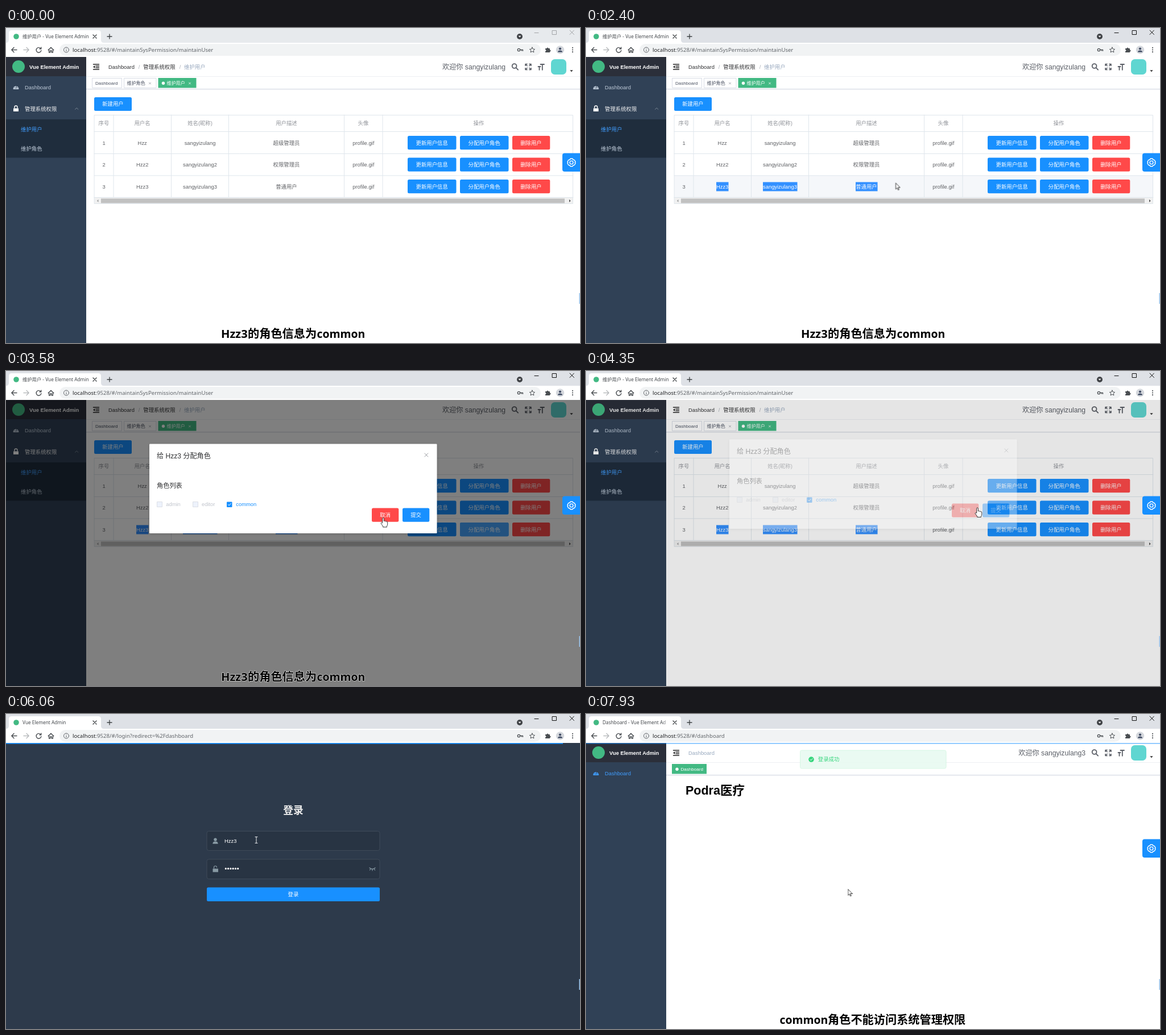
An HTML page for the animation above (8 s loop, 1009 by 555 pixels).

```html
<!DOCTYPE html>
<html lang="zh-CN">
<head>
<meta charset="utf-8">
<title>维护用户</title>
<style>
html, body { margin: 0; width: 100%; height: 100%; overflow: hidden; background: #fff; }
svg { display: block; width: 1009px; height: 555px; font: 9.4px "Liberation Sans", "Noto Sans CJK SC", "Noto Sans CJK", sans-serif; }
text { white-space: pre; }
.mid { text-anchor: middle; }
.ui { font-family: "Noto Sans", "Noto Sans CJK SC", "Noto Sans CJK", sans-serif; }
.tab { font-size: 8.3px; fill: #45494d; }
.url { font-size: 9.58px; fill: #5f6368; }
.host { fill: #202124; }
.tag { font-size: 8.05px; fill: #495060; }
.small { font-size: 9px; }
.caption { font: bold 20.2px "Noto Sans", "Noto Sans CJK SC", "Noto Sans CJK", sans-serif; stroke: #fff; stroke-width: 1; paint-order: stroke; }
.caption .en { font-size: 19.4px; }
.line { fill: none; stroke-linecap: round; stroke-linejoin: round; }
.blue { fill: #1890ff; }
.red { fill: #ff4949; }
.white { fill: #fff; }

/* Every part shares one 8 s clock: .cut switches hard, .glide interpolates. */
.cut { animation: 8s step-end infinite; }
.glide { animation: 8s linear infinite; }

@keyframes shell { 0% { opacity: 1 } 70.5% { opacity: 0 } 95.25%, to { opacity: 1 } }
@keyframes admin { 0% { opacity: 1 } 70.5%, to { opacity: 0 } }
@keyframes login { 0% { opacity: 0 } 70.5% { opacity: 1 } 95.25%, to { opacity: 0 } }
@keyframes home { 0% { opacity: 0 } 95.25%, to { opacity: 1 } }
@keyframes strip { 0% { fill: #e7eaed } 11.9%, to { fill: #dee1e6 } }
@keyframes controls { 0% { stroke: #a2a4a7 } 11.9%, to { stroke: #111 } }
@keyframes rowHover { 0% { opacity: 0 } 11% { opacity: 1 } 40%, to { opacity: 0 } }
@keyframes roleHover { 0% { opacity: 0 } 35.8% { opacity: 1 } 50%, to { opacity: 0 } }
@keyframes select {
  0%, 12% { width: 0 } 13.75% { width: 10px } 21.1% { width: 205px } 25%, to { width: 305px }
}
@keyframes dim {
  0%, 37.9% { opacity: 0 } 40.4%, 53% { opacity: .5 } 54.375%, 54.9% { opacity: .1 } 55.6%, to { opacity: 0 }
}
@keyframes dialog {
  0%, 37.9% { opacity: 0; transform: translateY(-20px) }
  41.6%, 53% { opacity: 1; transform: none }
  54.375%, 54.9% { opacity: .35; transform: translateY(-8px) }
  56.5%, to { opacity: 0; transform: translateY(-20px) }
}
@keyframes menu { 0%, 61.2% { opacity: 0 } 63.5%, 69% { opacity: 1 } 70.4%, to { opacity: 0 } }
@keyframes menuHover { 0% { opacity: 0 } 66.3%, to { opacity: 1 } }
@keyframes caret { 0% { opacity: 0 } 77% { opacity: 1 } 82.5% { opacity: 0 } 84.5% { opacity: 1 } 92.5%, to { opacity: 0 } }
@keyframes suggest {
  0%, 86.5% { opacity: 0 } 87.375%, 88.6% { opacity: .6 } 89.4%, 91.3% { opacity: 1 } 92.3%, to { opacity: 0 }
}
@keyframes pick { 0% { opacity: 0 } 90.5%, to { opacity: 1 } }
@keyframes press { 0% { opacity: 0 } 92.8%, to { opacity: 1 } }
@keyframes progress {
  0%, 69.5% { transform: scaleX(0); opacity: 1 }
  72% { transform: scaleX(.5); opacity: 1 }
  76% { transform: scaleX(1); opacity: 1 }
  79% { transform: scaleX(1); opacity: 0 }
  80%, 94.5% { transform: scaleX(0); opacity: 0 }
  95% { transform: scaleX(.1); opacity: 1 }
  98% { transform: scaleX(1); opacity: 1 }
  99.1%, to { transform: scaleX(1); opacity: .55 }
}
@keyframes toast {
  0%, 97% { opacity: 0; transform: translateY(-25px) }
  99.1% { opacity: .85; transform: none }
  to { opacity: .9; transform: translateY(1px) }
}
@keyframes captionA { 0% { opacity: 1 } 50%, to { opacity: 0 } }
@keyframes captionB { 0% { opacity: 0 } 96%, to { opacity: 1 } }
@keyframes pointer {
  0%, 1% { transform: translate(300px, 560px) }
  7.5% { transform: translate(180px, 345px) }
  10.4% { transform: translate(215px, 302px) }
  11.9% { transform: translate(226px, 280px) }
  13.75% { transform: translate(234px, 280px) }
  21.1% { transform: translate(430px, 283px) }
  25% { transform: translate(530px, 280px) }
  28%, 31.25% { transform: translate(544.5px, 273.5px) }
  36.25%, 38.1% { transform: translate(838px, 282px) }
  43.1%, 51.9% { transform: translate(663px, 258.5px) }
  54.375%, 55% { transform: translate(688px, 241px) }
  59.4%, 61.25% { transform: translate(972px, 68px) }
  66.9%, 69% { transform: translate(965.5px, 202px) }
  75.6%, 83.75% { transform: translate(440px, 222px) }
  87.375%, 88.6% { transform: translate(469.5px, 261px) }
  90.6%, 91.5% { transform: translate(440px, 326px) }
  93.5%, to { transform: translate(460.5px, 309px) }
}
@keyframes arrow {
  0% { opacity: 0 } 1% { opacity: 1 } 35.6% { opacity: 0 } 38.8% { opacity: 1 } 42.9% { opacity: 0 }
  55% { opacity: 1 } 59% { opacity: 0 } 61.5% { opacity: 1 } 62.5% { opacity: 0 } 69.5% { opacity: 1 }
  75.4% { opacity: 0 } 84% { opacity: 1 } 92.5% { opacity: 0 } 95.6%, to { opacity: 1 }
}
@keyframes hand {
  0% { opacity: 0 } 35.6% { opacity: 1 } 38.8% { opacity: 0 } 42.9% { opacity: 1 } 55% { opacity: 0 }
  59% { opacity: 1 } 61.5% { opacity: 0 } 62.5% { opacity: 1 } 69.5% { opacity: 0 }
  92.5% { opacity: 1 } 95.6%, to { opacity: 0 }
}
@keyframes beam { 0% { opacity: 0 } 75.4% { opacity: 1 } 84%, to { opacity: 0 } }
</style>
</head>
<body>
<svg viewBox="0 0 1009 555">
<defs>
  <g id="ops" class="mid white">
    <rect class="blue" x="706" y="190" width="85.5" height="24.3" rx="2.5"/>
    <rect class="blue" x="798" y="190" width="85.5" height="24.3" rx="2.5"/>
    <rect class="red" x="890" y="190" width="66.3" height="24.3" rx="2.5"/>
    <text x="748.7" y="205.5">更新用户信息</text>
    <text x="840.7" y="205.5">分配用户角色</text>
    <text x="923" y="205.5">删除用户</text>
  </g>
  <g id="gauge">
    <path d="M-4.8 3.6A4.9 4.9 0 1 1 4.8 3.6Z"/>
    <path d="M0 2 1-2M-3 .8h.4M2.7.8h.4M-2-1.9l.2.2" class="line" stroke="#304156"/>
  </g>
  <path id="x" class="line" d="M-3-3 3 3M3-3-3 3"/>
  <linearGradient id="fade"><stop stop-color="#fff" stop-opacity="0"/><stop offset="1" stop-color="#fff"/></linearGradient>
  <filter id="shadow" x="-20%" y="-20%" width="140%" height="150%"><feDropShadow dx="0" dy="1.3" stdDeviation="2.5" flood-opacity=".18"/></filter>
  <clipPath id="drag"><rect class="glide" style="animation-name:select" x="225" y="268" width="0" height="24"/></clipPath>
</defs>

<!-- browser -->
<rect class="cut" style="animation-name:strip" width="1009" height="27"/>
<path class="white" d="M0 26Q5 26 5 21V9Q5 4 10 4H162Q167 4 167 9V21Q167 26 172 26H1009V51H0Z"/>
<circle cx="18" cy="15" r="4.8" fill="#42b983"/>
<g class="ui tab">
  <text class="cut" style="animation-name:admin" x="29" y="18.3">维护用户 - Vue Element Admin</text>
  <text class="cut" style="animation-name:login" x="29" y="18.3">Vue Element Admin</text>
  <g class="cut" style="animation-name:home">
    <text x="29" y="18.3">Dashboard - Vue Element Ad</text>
    <rect x="134" y="8" width="14" height="14" fill="url(#fade)"/>
  </g>
</g>
<g stroke="#3c4043" stroke-width="1.3">
  <use href="#x" x="156" y="15"/>
  <path d="M177.5 15h9M182 10.5v9"/>
</g>
<circle cx="903" cy="15" r="5" fill="#404347"/>
<path class="white" d="M900.5 13.7h5L903 16.6Z"/>
<path class="line cut" style="animation-name:controls" d="M929 8.5h7M960.5 4.5h7v7h-7ZM991 4l7.5 7.5M998.5 4 991 11.5"/>

<g class="line" stroke="#4a4e52" stroke-width="1.4">
  <path d="M19 38.5H10M14 34.3l-4.2 4.2 4.2 4.2"/>
  <path stroke="#b8babd" d="M31 38.5h9M36 34.3l4.2 4.2-4.2 4.2"/>
  <path d="M61.2 36.3A4.4 4.4 0 1 0 61.9 39.5M61.8 34v2.8H59"/>
  <path d="M74.2 38.7 79 34.3l4.8 4.4M75.6 38v5h2.2v-3h2.4v3h2.2v-5"/>
</g>
<rect x="94" y="28" width="846" height="21" rx="10.5" fill="#f1f3f4"/>
<g class="line" stroke="#5f6368"><circle cx="106" cy="38.5" r="4.5"/><path d="M106 38.3v2.5M106 36.1v.1"/></g>
<g class="ui url">
  <text class="cut" style="animation-name:admin" x="117" y="42"><tspan class="host">localhost</tspan>:9528/#/maintainSysPermission/maintainUser</text>
  <text class="cut" style="animation-name:login" x="117" y="42"><tspan class="host">localhost</tspan>:9528/#/login?redirect=%2Fdashboard</text>
  <text class="cut" style="animation-name:home" x="117" y="42"><tspan class="host">localhost</tspan>:9528/#/dashboard</text>
</g>
<g class="line" stroke="#4a4e52" stroke-width="1.3">
  <circle cx="901.5" cy="38.5" r="2.2"/><path d="M904 38.3h4.5v2M906.3 38.3v1.8"/>
  <path stroke-width="1" d="M925 34l1.4 3 3.2.4-2.4 2.2.7 3.3-2.9-1.7-2.9 1.7.7-3.3-2.4-2.2 3.2-.4Z"/>
</g>
<path fill="#4a4e52" d="M948 36h2.4a1.6 1.6 0 1 1 3.2 0h2.4v2.4a1.6 1.6 0 1 1 0 3.2V43h-8v-2a1.4 1.4 0 1 0 0-2.8Z"/>
<circle cx="974" cy="38.5" r="7.2" fill="#d5d8dd"/>
<g fill="#3f4b63"><circle cx="974" cy="36.5" r="2.1"/><path d="M970 42.4q0-3 4-3t4 3Z"/></g>
<g fill="#4a4e52"><circle cx="996" cy="34.8" r="1.1"/><circle cx="996" cy="38.5" r="1.1"/><circle cx="996" cy="42.2" r="1.1"/></g>

<!-- shared shell -->
<g class="cut" style="animation-name:shell">
  <rect class="white" y="51" width="1009" height="504"/>
  <rect y="51" width="141" height="504" fill="#304156"/>
  <rect y="51" width="141" height="34" fill="#2b2f3a"/>
  <circle cx="22" cy="68" r="11" fill="#42b983"/>
  <text class="white" x="41" y="71.6" font-weight="bold">Vue Element Admin</text>
  <path stroke="#eef0f3" d="M141 85.5h868"/>
  <path stroke="#d8dce5" d="M141 107.5h868"/>
  <path stroke="#f3f4f6" d="M141 108.5h868"/>
  <g class="line" stroke="#222" stroke-width="1.4"><path d="M153.5 64h10M158 67h5.5M158 70h5.5M153.5 73h10"/></g>
  <path fill="#222" d="M156.3 66v5l-3.2-2.5Z"/>
  <g class="line" stroke="#5a5e66" stroke-width="1.8">
    <circle cx="893.6" cy="67" r="3.9"/><path d="M896.6 70.2l3.5 3.5"/>
    <path stroke-width="1.5" d="M913 66.5V63.500h3.200M919.800 63.500h3.200v3M923 70.500v3h-3.200M916.200 73.500H913v-3M913.200 63.700l3 3M922.800 63.700l-3 3M913.200 73.300l3-3M922.800 73.300l-3-3"/>
    <path d="M939.500 64h6.500M942.800 64v9.800M935.500 68h4M937.500 68v5.800"/>
  </g>
  <rect x="958" y="55" width="27" height="27" rx="6.7" fill="#5fd6d1"/>
  <path fill="#333" d="M991.3 74.300h5.400l-2.700 2.900Z"/>
</g>

<!-- user table -->
<g class="cut" style="animation-name:admin">
  <g fill="#bfcbd9">
    <use href="#gauge" x="17.500" y="104.500"/>
    <text x="33" y="108">Dashboard</text>
  </g>
  <path class="white" d="M13 141.500h9v5.500h-9Z"/>
  <path class="line" stroke="#fff" stroke-width="1.400" d="M15 141v-1.500a2.500 2.500 0 0 1 5 0v1.500"/>
  <text x="33" y="146" fill="#f4f4f5">管理系统权限</text>
  <path class="line" stroke="#7b8796" d="M121.500 143.300l2.700-2.500 2.700 2.500"/>
  <rect y="161" width="141" height="67.500" fill="#1f2d3d"/>
  <text x="26" y="181.700" fill="#409eff">维护用户</text>
  <text x="26" y="215.700" fill="#bfcbd9">维护角色</text>

  <g fill="#303133">
    <text x="180" y="71.700">Dashboard</text>
    <text x="241.300" y="71.700">管理系统权限</text>
    <text x="232.800" y="71.700" fill="#a9adb5">/</text>
    <text x="304.700" y="71.700" fill="#a9adb5">/</text>
    <text x="313" y="71.700" fill="#97a8be">维护用户</text>
  </g>
  <text x="878" y="72.600" font-size="12.200" fill="#5a5e66" text-anchor="end">欢迎你 sangyizulang</text>

  <g class="tag">
    <g class="white" stroke="#d8dce5"><path d="M151.500 88.500h52v17h-52ZM207.500 88.500h56.500v17h-56.500Z"/></g>
    <rect x="267.500" y="88" width="67" height="17.500" fill="#42b983"/>
    <circle class="white" cx="276.500" cy="97.300" r="2.700"/>
    <text x="157" y="100">Dashboard</text>
    <text x="212.500" y="100">维护角色</text>
    <text class="white" x="282.500" y="100">维护用户</text>
    <use href="#x" transform="translate(253 97.500) scale(.5)" stroke="#8b909a" stroke-width="1.500"/>
    <use href="#x" transform="translate(323 97.500) scale(.5)" stroke="#fff" stroke-width="1.500"/>
  </g>

  <rect class="blue" x="155" y="122" width="66" height="24" rx="2.500"/>
  <text class="mid white" x="188" y="137.200">新建用户</text>

  <rect class="cut" style="animation-name:rowHover" x="155" y="260" width="842" height="38.500" fill="#f5f7fa"/>
  <rect x="155" y="299" width="842" height="11" fill="#f1f1f1"/>
  <rect x="167" y="300.500" width="815" height="8" fill="#c1c1c1"/>
  <path fill="#a3a3a3" d="M162.500 302v5l-2.700-2.500Z"/>
  <path fill="#505050" d="M990 302v5l2.700-2.500Z"/>
  <path class="line" stroke="#dfe6ec" d="M155.500 153.500H996.500V309.500H155.500ZM155 182.500H997M155 221.500H997M155 260H997M155 298.500H997M189 153V298.500M290.500 153V298.500M391.500 153V298.500M594.500 153V298.500M662 153V298.500"/>
  <g class="mid" fill="#909399">
    <text x="172" y="171">序号</text><text x="239.500" y="171">用户名</text><text x="341" y="171">姓名(昵称)</text>
    <text x="493" y="171">用户描述</text><text x="628" y="171">头像</text><text x="831" y="171">操作</text>
  </g>
  <g class="mid" fill="#606266">
    <text x="172" y="205.500">1</text><text x="239.700" y="205.500">Hzz</text><text x="341" y="205.500">sangyizulang</text>
    <text x="493" y="205.500">超级管理员</text><text x="628.300" y="205.500">profile.gif</text>
    <text x="172" y="244">2</text><text x="239.700" y="244">Hzz2</text><text x="341" y="244">sangyizulang2</text>
    <text x="493" y="244">权限管理员</text><text x="628.300" y="244">profile.gif</text>
    <text x="172" y="282.700">3</text><text x="239.700" y="282.700">Hzz3</text><text x="341" y="282.700">sangyizulang3</text>
    <text x="493" y="282.700">普通用户</text><text x="628.300" y="282.700">profile.gif</text>
  </g>
  <g class="mid white" clip-path="url(#drag)">
    <path fill="#3390ff" d="M229 271.500h21.500v16H229ZM311 271.500h60.500v16H311ZM474 271.500h38.500v16H474Z"/>
    <text x="239.700" y="282.700">Hzz3</text><text x="341" y="282.700">sangyizulang3</text><text x="493" y="282.700">普通用户</text>
  </g>
  <use href="#ops"/><use href="#ops" y="38.500"/><use href="#ops" y="77"/>
  <g class="cut mid white" style="animation-name:roleHover">
    <rect x="798" y="267" width="85.500" height="24.300" rx="2.500" fill="#46a6ff"/>
    <text x="840.700" y="282.500">分配用户角色</text>
  </g>

  <rect class="glide" style="animation-name:dim" y="51" width="1009" height="504"/>
  <g class="glide" style="animation-name:dialog">
    <rect class="white" x="252" y="128.500" width="505.500" height="157.500" rx="1.300" filter="url(#shadow)"/>
    <g fill="#303133">
      <text x="265" y="154" font-size="12.100">给 Hzz3 分配角色</text>
      <text x="265" y="206.300" font-size="11.200">角色列表</text>
    </g>
    <use href="#x" x="738.800" y="148" stroke="#909399" stroke-width=".9"/>
    <path fill="#edf2fc" stroke="#dcdfe6" d="M265.500 230.500h9v9h-9ZM328.500 230.500h9v9h-9Z"/>
    <rect class="blue" x="388" y="230.500" width="9.500" height="9.500" rx="1"/>
    <path class="line" stroke="#fff" d="M390.500 235.200l1.700 1.800 3-3.500"/>
    <g fill="#c0c4cc"><text x="281.300" y="238.200">admin</text><text x="344" y="238.200">editor</text></g>
    <text class="blue" x="404.300" y="238.200">common</text>
    <rect class="red" x="643" y="241.500" width="47.300" height="24.300" rx="2.500"/>
    <rect class="blue" x="697" y="241.500" width="47.300" height="24.300" rx="2.500"/>
    <g class="mid white"><text x="666.600" y="257">取消</text><text x="720.600" y="257">提交</text></g>
  </g>

  <g class="glide" style="animation-name:menu" fill="#606266">
    <path class="white" stroke="#e6eaf1" d="M919.500 93.500H967l4-3.500 4 3.500h14.500v119.500h-70Z" filter="url(#shadow)"/>
    <path stroke="#ebeef5" d="M920 183.500h69"/>
    <text x="931" y="111.500">Profile</text>
    <text x="931" y="131.700">Dashboard</text>
    <text x="931" y="152">Repovo</text>
    <text x="931" y="172.500">文档</text>
    <text x="931" y="201.500">退出</text>
    <g class="cut" style="animation-name:menuHover">
      <rect x="920" y="188" width="69.500" height="20" fill="#e8f4ff"/>
      <text x="931" y="201.500" fill="#46a6ff">退出</text>
    </g>
  </g>
</g>

<!-- dashboard -->
<g class="cut" style="animation-name:home">
  <g fill="#409eff"><use href="#gauge" x="17.500" y="104.500"/><text x="33" y="108">Dashboard</text></g>
  <text x="180" y="71.700" fill="#97a8be">Dashboard</text>
  <text x="878" y="72.600" font-size="12.200" fill="#5a5e66" text-anchor="end">欢迎你 sangyizulang3</text>
  <rect x="151" y="88" width="61" height="17.500" fill="#42b983"/>
  <circle class="white" cx="160" cy="97.300" r="2.700"/>
  <text class="tag" x="166.500" y="100" style="fill:#fff">Dashboard</text>
  <text x="175" y="142" font-size="21.500" font-weight="bold">Podra医疗</text>
  <g class="glide" style="animation-name:toast" fill="#13ce66">
    <rect x="376.500" y="64" width="256.500" height="32" rx="2.700" fill="#e7faf0" stroke="#d0f5e0"/>
    <circle cx="396" cy="80" r="4.800"/>
    <path class="line" stroke="#fff" d="M393.800 80l1.600 1.700 2.900-3.200"/>
    <text x="407.800" y="83.400" font-weight="500">登录成功</text>
  </g>
</g>

<g class="cut" style="animation-name:shell">
  <path class="blue" d="M1009 220.500H982q-4 0-4 4v24.500q0 4 4 4h27Z"/>
  <g class="line" stroke="#fff" stroke-width="1.400">
    <path d="M992 230.300h4l1 1.900 2.200.3 1.900 3.300-1 1.200 1 1.200-1.900 3.300-2.200.3-1 1.900h-4l-1-1.900-2.200-.3-1.900-3.300 1-1.200-1-1.200 1.900-3.300 2.200-.3Z"/>
    <circle cx="994" cy="237" r="2.900"/>
  </g>
</g>

<!-- login -->
<g class="cut" style="animation-name:login">
  <rect y="51" width="1009" height="504" fill="#2d3a4b"/>
  <text class="mid" x="505" y="175.700" font-size="17.800" font-weight="bold" fill="#eee">登录</text>
  <g fill="#283443" stroke="#3e4a59">
    <rect x="353" y="206.500" width="304" height="34" rx="3.400"/>
    <rect x="353" y="256" width="304" height="34.500" rx="3.400"/>
  </g>
  <g fill="#889aa4">
    <circle cx="368" cy="221.300" r="2.700"/><path d="M363.300 228.800q0-4.300 4.700-4.300t4.700 4.300Z"/>
    <path d="M363.500 272.500h9.500v6h-9.500Z"/>
  </g>
  <g class="line" stroke="#889aa4" stroke-width="1.200">
    <path d="M365.500 272v-1.500a2.500 2.500 0 0 1 5-.5"/>
    <path d="M639 271q5 4.500 10 0M640.500 273.500l-1 1.500M644 274v2M647.500 273.500l1 1.500"/>
  </g>
  <text class="white" x="384" y="226.800">Hzz3</text>
  <path class="cut" style="animation-name:caret" stroke="#fff" d="M405.500 217v12"/>
  <path class="line" stroke="#fff" stroke-width="3.200" stroke-dasharray="0 4.280" d="M386.300 272.400h22"/>
  <rect class="blue" x="353" y="305.500" width="304" height="24.500" rx="2.500"/>
  <rect class="cut" style="animation-name:press" x="353" y="305.500" width="304" height="24.500" rx="2.500" fill="#46a6ff"/>
  <text class="mid white" x="505" y="321">登录</text>
  <g class="glide" style="animation-name:suggest">
    <rect class="white" x="376.500" y="240.500" width="252" height="154" rx="2.500" stroke="#c8cbd0"/>
    <rect class="cut" style="animation-name:pick" x="377" y="317.500" width="251" height="24" fill="#e8e8e9"/>
    <g class="ui small" fill="#202124">
      <text x="384.500" y="261">Hzz</text><text x="384.500" y="284.800">Hzz2</text><text x="384.500" y="308.600">Hzz4</text>
      <text x="384.500" y="332.400">Hzz3</text><text x="384.500" y="356.200">Hzz5</text><text x="384.500" y="380">Hzz6</text>
    </g>
  </g>
</g>

<rect class="glide blue" style="animation-name:progress" y="51" width="1009" height="1.700"/>
<rect x="1007.500" y="467" width="1.500" height="19" fill="#9cc6ee"/>

<text class="caption cut" style="animation-name:captionA" y="545.500"><tspan x="378">Hzz3</tspan><tspan x="425">的角色信息为</tspan><tspan class="en" x="546.500">common</tspan></text>
<text class="caption cut" style="animation-name:captionB" y="545.500"><tspan class="en" x="340.500">common</tspan><tspan x="425">角色不能访问系统管理权限</tspan></text>

<!-- pointer -->
<g class="glide" style="animation-name:pointer">
  <path class="cut line" style="animation-name:arrow;fill:#fff" stroke="#222" stroke-width=".9" d="M0 0V10.500L2.500 8.200 4.200 12 5.800 11.300 4.100 7.600H7.300Z"/>
  <path class="cut line" style="animation-name:hand;fill:#fff" stroke="#222" stroke-width=".9" d="M-1.300 9V1.300a1.300 1.300 0 0 1 2.600 0V6q1.200-1 2.300.3 1.200-.8 2.200.5 1.700-.4 1.900 1.500V11.500q0 2-1.300 3.300V16.500H-.3V15L-3.800 10.300q-.4-1.500 1-1.700Z"/>
  <path class="cut line" style="animation-name:beam" stroke="#e8eaed" d="M-2-5.500h4M0-5.500v11M-2 5.500h4"/>
</g>
</svg>
</body>
</html>
```
